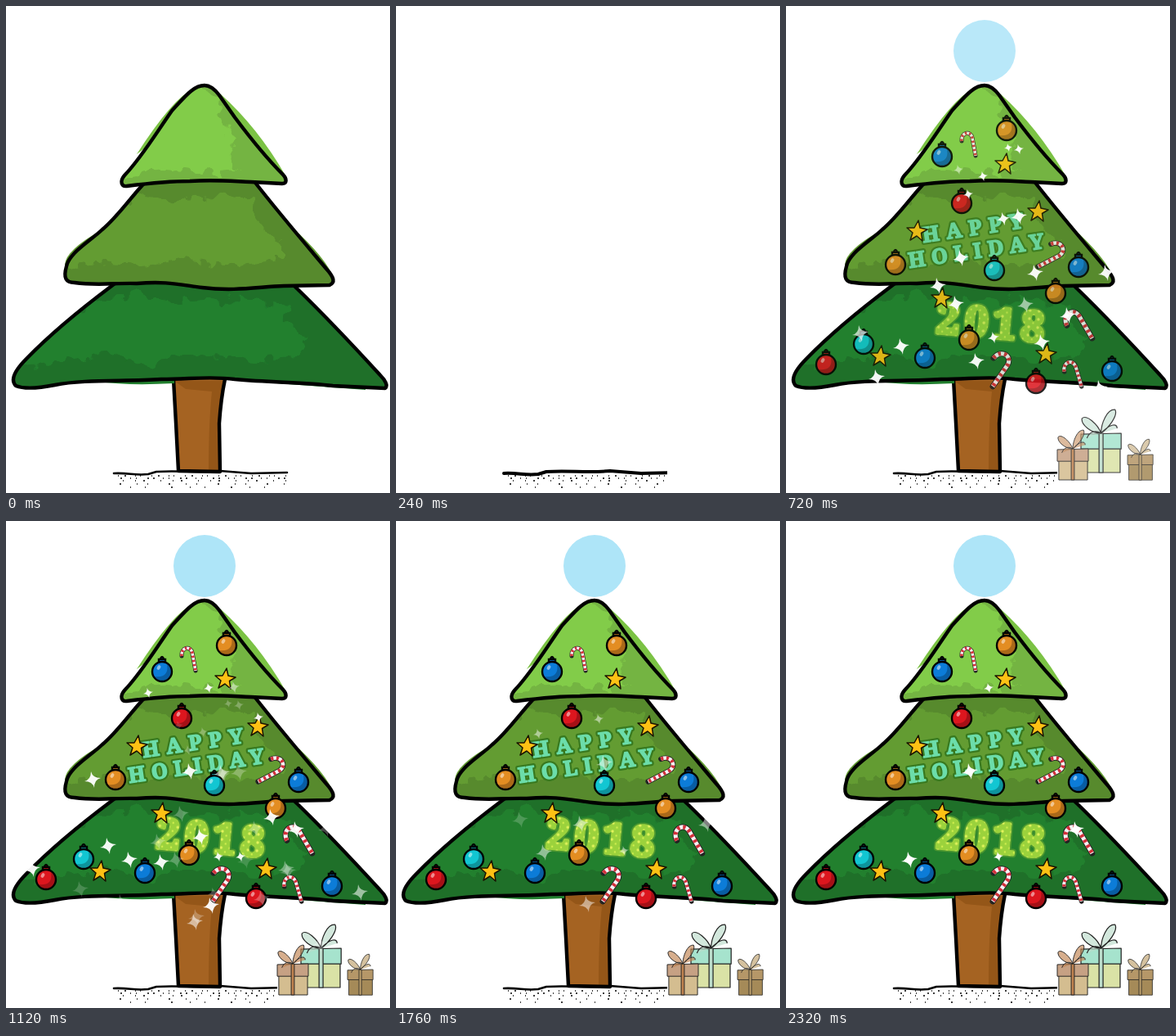
An HTML page without scripts for the animation above (2.4 s loop, 470 px wide and 595 px high).

```html
<!DOCTYPE html>
<html lang="en">
<head>
<meta charset="utf-8">
<title>Happy holiday tree</title>
<style>
html, body { margin: 0; width: 100%; height: 100%; overflow: hidden; background: #fff; }
svg { display: block; width: 470px; height: 595px; }

.scene, .decor, .cover, .soil, .fall { animation: 2.4s step-end infinite; }
.scene { animation-name: fade; }
.decor { animation-name: appear; }
.cover { animation-name: cover; }
.soil { animation-name: soil; }
.first { animation-name: first; }
.second { animation-name: second; }
.third { animation-name: third; }
.last { animation-name: last; }

@keyframes fade {
  0% { opacity: 1; } 3.333% { opacity: .66; } 6.666% { opacity: .33; } 10% { opacity: 0; }
  23.333% { opacity: .34; } 26.666% { opacity: .67; } 30%, 100% { opacity: 1; }
}
@keyframes appear { 0% { opacity: 0; } 23.333% { opacity: 1; } 30% { opacity: .86; } 33.333%, 100% { opacity: 1; } }
@keyframes cover { 0% { opacity: 0; } 10%, 100% { opacity: 1; } }
@keyframes soil { 0% { stroke-width: 2.6; } 10% { stroke-width: 4; } 30%, 100% { stroke-width: 2.6; } }

/* each batch of sparkles drifts down in 80 ms steps */
@keyframes first {
  0% { opacity: 0; }
  23.333% { opacity: 1; transform: none; animation-timing-function: steps(2); }
  30% { opacity: .95; transform: translateY(20px); animation-timing-function: steps(7); }
  53.333%, 100% { opacity: 0; transform: translateY(90px); }
}
@keyframes second {
  0% { opacity: 0; }
  40% { opacity: 0; transform: translateY(-20px); animation-timing-function: steps(2); }
  46.666% { opacity: .95; transform: none; animation-timing-function: steps(8); }
  73.333%, 100% { opacity: 0; transform: translateY(80px); }
}
@keyframes third {
  0% { opacity: 0; }
  56.666% { opacity: 0; transform: translateY(-50px); animation-timing-function: steps(2); }
  63.333% { opacity: .9; transform: translateY(-30px); animation-timing-function: steps(3); }
  73.333% { opacity: .5; transform: none; animation-timing-function: steps(2); }
  80%, 100% { opacity: 0; transform: translateY(20px); }
}
@keyframes last {
  0% { opacity: 0; }
  93.333% { opacity: .6; transform: translateY(-10px); }
  96.666%, 100% { opacity: 1; transform: none; }
}

.ink { fill: none; stroke: #000; stroke-width: 4.4; stroke-linejoin: round; stroke-linecap: round; }
.dots { stroke: #000; stroke-width: 1.4; }
text { font-family: "Noto Serif", "Liberation Serif", serif; font-weight: 900; stroke-linejoin: round; }
</style>
</head>
<body>
<svg viewBox="0 0 470 595">
  <defs>
    <filter id="rough" x="-10%" y="-10%" width="120%" height="120%">
      <feTurbulence type="fractalNoise" baseFrequency=".07" numOctaves="2" seed="4"/>
      <feDisplacementMap in="SourceGraphic" scale="26" xChannelSelector="R" yChannelSelector="G"/>
    </filter>

    <path id="top" d="M243 97C229 97 218 112 203 128C184 155 166 185 145 207C139 214 141 221 148 220C172 217 196 214 225 214C255 212 275 214 300 215L338 217C344 217 344 211 339 206C318 185 298 160 280 136L261 109Q252 97 243 97Z"/>
    <path id="mid" d="M166 220C152 235 136 258 118 273C102 288 77 302 74 318C70 332 73 338 84 338C112 342 135 338 160 339C195 336 210 340 240 344C280 349 310 343 340 342L396 341C403 338 402 332 392 321C365 289 335 254 306 217L298 207H178Z"/>
    <path id="low" d="M128 343C96 367 58 397 25 431C8 448 6 458 12 464C24 469 45 466 60 463C95 456 145 459 190 456C225 456 250 452 280 456C325 460 365 460 400 464L464 467C468 464 464 457 458 451C425 415 390 378 357 346L344 334H140Z"/>
    <clipPath id="inTop"><use href="#top"/></clipPath>
    <clipPath id="inMid"><use href="#mid"/></clipPath>
    <clipPath id="inLow"><use href="#low"/></clipPath>

    <g id="ball">
      <path d="M-4-11V-15H4V-11M-2-16Q0-20 2-16" stroke="#000" stroke-width="2.4"/>
      <circle r="12" stroke="#000" stroke-width="2.4"/>
      <path d="M6-9A11 11 0 1 1-9 6Q9 8 6-9Z" fill="#000" opacity=".25"/>
      <ellipse cx="-4" cy="-5" rx="2" ry="3" fill="#fff" opacity=".5" transform="rotate(30 -4 -5)"/>
    </g>
    <path id="star" d="M2-13L4-4 13-2 5.5 2.5 7 12 0 6-8 11-5 2-12-4-3-4Z" fill="#fdc114" stroke="#1a1300" stroke-width="1.5" stroke-linejoin="round"/>
    <path id="hook" d="M-9-3C-10-14 2-16 4-7L8 15"/>
    <g id="cane" fill="none">
      <use href="#hook" stroke="#222" stroke-width="5" stroke-linecap="round"/>
      <use href="#hook" stroke="#f4f4f4" stroke-width="3.6"/>
      <use href="#hook" stroke="#d4303a" stroke-width="3.6" stroke-dasharray="2.4 2.8"/>
    </g>
    <g id="gift" stroke="#222" stroke-width="1" stroke-linejoin="round">
      <path d="M2 15H39V40H2Z" fill="var(--body)"/>
      <path d="M0 1L40 0V16H0Z" fill="var(--lid)"/>
      <path d="M18 0H22V40H18Z" fill="var(--bow)"/>
      <path d="M20 0C10 0 0-9 1-15C5-20 17-9 20 0C20-10 26-25 34-24C37-18 28-6 20 0C28-9 36-11 36-5M20 0C14-4 8-1 6 5" fill="var(--bow)" fill-opacity=".65"/>
    </g>
    <path id="spark" d="M-2-10Q0-2 10-2Q2 0 2 10Q0 2-10 2Q-2 0-2-10Z" fill="#fff"/>
    <g id="few">
      <use href="#spark" transform="translate(248 204) scale(.6)"/>
      <use href="#spark" transform="translate(225 306)"/>
      <use href="#spark" transform="translate(151 414)"/>
      <use href="#spark" transform="translate(260 410) scale(.6)"/>
      <use href="#spark" transform="translate(355 377)"/>
    </g>
    <pattern id="speckle" width="11" height="10" patternUnits="userSpaceOnUse">
      <path d="M0 0H11V10H0Z" fill="#9bd23c"/>
      <circle cx="3" cy="3" r="1.7" fill="#e4f45c"/>
      <circle cx="8" cy="8" r="1.2" fill="#d2f04e"/>
    </pattern>
    <g id="greeting" font-size="25.5">
      <text letter-spacing="8.6" transform="translate(168 289) rotate(-8.3)">HAPPY</text>
      <text letter-spacing="7.6" transform="translate(151 320) rotate(-8.3)">HOLIDAY</text>
    </g>
    <text id="year" font-size="51" letter-spacing="6" transform="translate(183 399) rotate(5)">2018</text>
  </defs>

  <g class="dots">
    <path d="M137 574H345" stroke-dasharray="1 7 2 11 1 5 1 13"/>
    <path d="M140 577H345" stroke-dasharray="2 10 1 6 1 13 2 5"/>
    <path d="M143 580H345" stroke-dasharray="1 14 1 9 2 19"/>
    <path d="M139 584H345" stroke-dasharray="2 19 1 12 1 25"/>
    <path d="M152 588H345" stroke-dasharray="1 17 1 31 2 21"/>
  </g>
  <path class="ink soil" d="M132 571C150 570 158 574 174 572L184 569C215 567 232 571 262 568L300 571 344 570"/>
  <path class="cover" d="M332 564H350V594H332Z" fill="#fff"/>

  <g class="scene">
    <path d="M205 456L208 510 211 568H262L261 510 268 455Z" fill="#a56322"/>
    <path d="M206 458H268L261 510 262 568H248Q248 510 252 471L220 468Z" fill="#945618"/>
    <path class="ink" d="M205 456L208 510 211 568 262 569 261 510Q263 480 268 456"/>

    <path d="M112 459Q150 464 206 461V452H112ZM318 460L440 469V460Z" fill="#22802f"/>
    <use href="#low" fill="#1f7029"/>
    <g clip-path="url(#inLow)">
      <path filter="url(#rough)" fill="#22802f" d="M100 365L160 352 210 362 280 358 345 365 342 385 368 405 355 428 290 432 230 422 170 438 130 423 80 434 0 442V420Z"/>
    </g>
    <use href="#low" class="ink"/>

    <path d="M118 273Q73 298 72 316L90 310ZM350 270Q392 308 402 334L380 315Z" fill="#639c33"/>
    <use href="#mid" fill="#578a2d"/>
    <g clip-path="url(#inMid)">
      <path filter="url(#rough)" fill="#639c33" d="M140 240L180 232 215 238 270 232 305 240 310 265 335 290 335 310 280 318 220 308 170 318 120 312 50 327V300Z"/>
    </g>
    <use href="#mid" class="ink"/>

    <path d="M230 100Q203 114 160 181L178 168ZM262 107Q308 148 342 207L300 165Z" fill="#7bc244"/>
    <use href="#top" fill="#74b442"/>
    <g clip-path="url(#inTop)">
      <path filter="url(#rough)" fill="#82cc48" d="M236 102L258 108 266 140 281 165 274 185 285 200 230 204 190 199 150 208 110 212 200 80Z"/>
    </g>
    <use href="#top" class="ink"/>

    <g class="decor">
      <circle cx="243" cy="55" r="38" fill="#aee5f8"/>

      <use href="#greeting" fill="#38791f" stroke="#38791f" stroke-width="6"/>
      <use href="#greeting" fill="#6cddaa" stroke="#6cddaa" stroke-width="1.6"/>
      <use href="#year" fill="#4b9630" stroke="#4b9630" stroke-width="8"/>
      <use href="#year" fill="url(#speckle)" stroke="url(#speckle)" stroke-width="4.5"/>

      <use href="#star" x="268" y="193"/>
      <use href="#star" x="308" y="251"/>
      <use href="#star" x="160" y="275"/>
      <use href="#star" x="190" y="357"/>
      <use href="#star" x="115" y="428"/>
      <use href="#star" x="318" y="425"/>

      <g fill="#e38d22">
        <use href="#ball" x="270" y="152"/>
        <use href="#ball" x="134" y="316"/>
        <use href="#ball" x="330" y="351"/>
        <use href="#ball" x="224" y="408"/>
      </g>
      <g fill="#0c7cd8">
        <use href="#ball" x="191" y="184"/>
        <use href="#ball" x="358" y="319"/>
        <use href="#ball" x="170" y="430"/>
        <use href="#ball" x="399" y="446"/>
      </g>
      <g fill="#dc161e">
        <use href="#ball" x="215" y="241"/>
        <use href="#ball" x="49" y="438"/>
        <use href="#ball" x="306" y="461"/>
      </g>
      <g fill="#12c6d2">
        <use href="#ball" x="255" y="323"/>
        <use href="#ball" x="95" y="413"/>
      </g>

      <use href="#cane" transform="translate(224 168)"/>
      <use href="#cane" transform="translate(324 303) rotate(73) scale(1.28)"/>
      <use href="#cane" transform="translate(357 390) rotate(-20) scale(1.4)"/>
      <use href="#cane" transform="translate(260 442) rotate(45) scale(1.4)"/>
      <use href="#cane" transform="translate(351 449) rotate(-6) scale(1.12)"/>

      <use href="#gift" transform="translate(361 522) scale(1.23 1.2)" style="--lid:#a6e3cd;--body:#dae2a6;--bow:#bcdccb"/>
      <use href="#gift" transform="translate(332 541) scale(.95)" style="--lid:#c6a184;--body:#d4bd90;--bow:#c08350"/>
      <use href="#gift" transform="translate(418 548) scale(.78)" style="--lid:#b59768;--body:#a58a58;--bow:#bda06c"/>
    </g>
  </g>

  <g class="fall first">
    <use href="#spark" transform="translate(285 155) scale(.6)"/>
    <use href="#spark" transform="translate(272 153) scale(.5)"/>
    <use href="#spark" transform="translate(211 180) scale(.6)" opacity=".5"/>
    <use href="#spark" transform="translate(241 188) scale(.6)"/>
    <use href="#spark" transform="translate(223 210) scale(.6)"/>
    <use href="#spark" transform="translate(285 237)"/>
    <use href="#spark" transform="translate(266 240) scale(.8)"/>
    <use href="#spark" transform="translate(214 288)"/>
    <use href="#spark" transform="translate(186 322)"/>
    <use href="#spark" transform="translate(305 306)"/>
    <use href="#spark" transform="translate(392 306)"/>
    <use href="#spark" transform="translate(208 344)"/>
    <use href="#spark" transform="translate(293 345)" opacity=".6"/>
    <use href="#spark" transform="translate(345 358)"/>
    <use href="#spark" transform="translate(91 380)" opacity=".7"/>
    <use href="#spark" transform="translate(254 385) scale(.7)"/>
    <use href="#spark" transform="translate(313 391)"/>
    <use href="#spark" transform="translate(141 396)"/>
    <use href="#spark" transform="translate(233 414)"/>
    <use href="#spark" transform="translate(111 434)"/>
    <use href="#spark" transform="translate(384 447)"/>
  </g>
  <g class="fall second">
    <use href="#few"/>
    <use href="#spark" transform="translate(174 210) scale(.6)"/>
    <use href="#spark" transform="translate(279 203) scale(.7)" opacity=".5"/>
    <use href="#spark" transform="translate(309 240) scale(.6)"/>
    <use href="#spark" transform="translate(106 316)"/>
    <use href="#spark" transform="translate(264 308)" opacity=".6"/>
    <use href="#spark" transform="translate(325 362)"/>
    <use href="#spark" transform="translate(238 386)"/>
    <use href="#spark" transform="translate(125 397)"/>
    <use href="#spark" transform="translate(190 417)"/>
    <use href="#spark" transform="translate(287 410) scale(.6)"/>
    <use href="#spark" transform="translate(407 380)"/>
    <use href="#spark" transform="translate(32 425)"/>
    <use href="#spark" transform="translate(343 425)" opacity=".4"/>
    <use href="#spark" transform="translate(433 454)" opacity=".6"/>
    <use href="#spark" transform="translate(251 470)"/>
    <use href="#spark" transform="translate(231 490)" opacity=".6"/>
  </g>
  <g class="fall third">
    <use href="#spark" transform="translate(248 242) scale(.6)"/>
    <use href="#spark" transform="translate(174 260) scale(.6)"/>
    <use href="#spark" transform="translate(255 296)"/>
    <use href="#spark" transform="translate(226 370)"/>
    <use href="#spark" transform="translate(152 365)" opacity=".4"/>
    <use href="#spark" transform="translate(380 370)"/>
    <use href="#spark" transform="translate(181 405)"/>
    <use href="#spark" transform="translate(279 403) scale(.6)"/>
    <use href="#spark" transform="translate(234 468)"/>
  </g>
  <g class="fall last"><use href="#few"/></g>
</svg>
</body>
</html>
```
